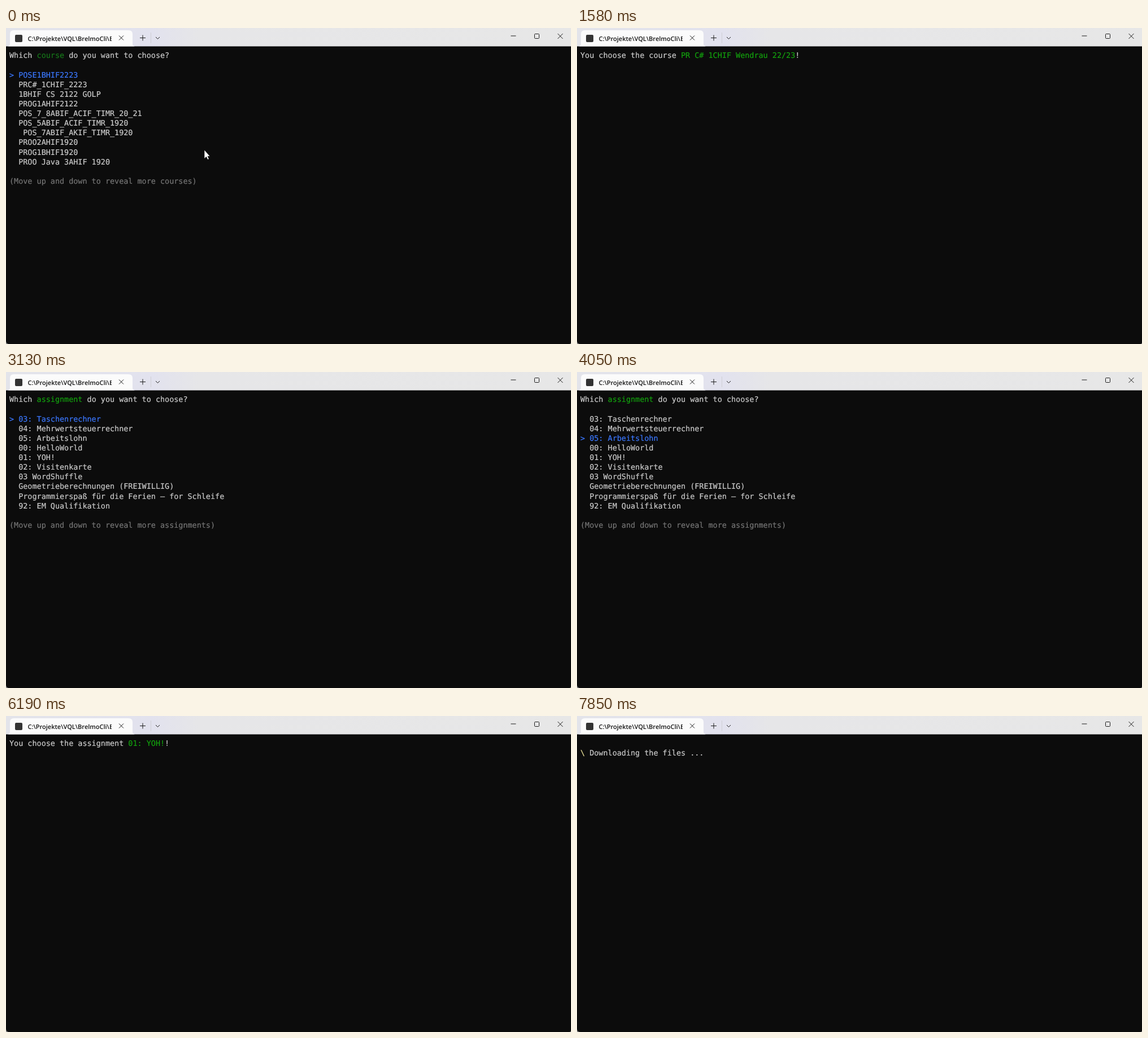
An HTML page for the animation above (7.99 s loop, 1000 by 560 pixels).

```html
<!DOCTYPE html>
<html lang="en">
<head>
<meta charset="utf-8">
<title>Terminal</title>
<style>
  html, body { margin: 0; width: 100%; height: 100%; overflow: hidden; background: #8c8c8c; }
  svg { display: block; width: 1000px; height: 560px; }
  text { white-space: pre; text-rendering: geometricPrecision; }
  #term { font: 13.454px "DejaVu Sans Mono", "Noto Sans Mono", monospace; font-variant-ligatures: none; }
  #term tspan { fill: var(--ink); stroke: var(--ink); stroke-width: .2px; }
  .title { font: 600 11px "Open Sans", "Noto Sans", sans-serif; fill: #111; }
  .line { fill: none; stroke: #1b1b1b; stroke-width: 1; }
  .plain { --ink: #ccc; }
  .green { --ink: #13a10e; }
  .dim { --ink: #17781a; }
  .blue { --ink: #3b78ff; }
  .gray { --ink: #767676; }
  .yellow { --ink: #f0e79c; }
</style>
</head>
<body>
<svg viewBox="0 0 1000 560">
  <defs>
    <linearGradient id="bar">
      <stop offset="0" stop-color="#e3e4ea"/>
      <stop offset=".26" stop-color="#e2e2ee"/>
      <stop offset=".34" stop-color="#e6e6e8"/>
      <stop offset="1" stop-color="#e7e7e7"/>
    </linearGradient>
    <clipPath id="titleClip"><rect x="36" y="8" width="151" height="20"/></clipPath>
  </defs>

  <path d="M0 30H1000V557Q1000 560 997 560H6Q0 560 0 554Z" fill="#0c0c0c"/>
  <rect width="1000" height="32.5" fill="url(#bar)"/>
  <path d="M3 32.500Q7 32 7 28V11Q7 4 14 4H217Q224 4 224 11V28Q224 32 228 32.500Z" fill="#fbfbfb"/>
  <rect x="16" y="12" width="13" height="13" rx="2" fill="#333"/>
  <g clip-path="url(#titleClip)"><text class="title" x="38.5" y="22.5" textLength="">C:\Projekte\VQL\BrelmoCli\B</text></g>
  <path class="line" d="M200 13.500l8 8m0-8l-8 8M237 17.500h10m-5-5v10M265 16l3.500 3.500 3.500-3.500"/>
  <path d="M256.500 8v19" stroke="#cfcfd6"/>
  <path class="line" d="M893.500 14h9M976.500 10l9 9m0-9l-9 9"/>
  <rect class="line" x="935.5" y="10.5" width="8" height="8" rx="1"/>

  <g id="term"></g>
  <path id="pointer" d="M351 216V231.500L354.500 228.200 357 233.300 359.300 232.200 357 227.300H361Z"
        fill="#fff" stroke="#000" stroke-width=".6"/>
</svg>

<script>
const LOOP = 7990;
const ROW = 17.12;
const SPIN = "-\\|/";
const term = document.getElementById("term");
const pointer = document.getElementById("pointer");

const courses = [
  "POSE1BHIF2223", "PRC#_1CHIF_2223", "1BHIF CS 2122 GOLP", "PROG1AHIF2122",
  "POS_7_8ABIF_ACIF_TIMR_20_21", "POS_5ABIF_ACIF_TIMR_1920", " POS_7ABIF_AKIF_TIMR_1920",
  "PROO2AHIF1920", "PROG1BHIF1920", "PROO Java 3AHIF 1920"
];
const tasks = [
  "03: Taschenrechner", "04: Mehrwertsteuerrechner", "05: Arbeitslohn", "00: HelloWorld",
  "01: YOH!", "02: Visitenkarte", "03 WordShuffle", "Geometrieberechnungen (FREIWILLIG)",
  "Programmierspaß für die Ferien – for Schleife", "92: EM Qualifikation"
];

function el(name, attrs, text = "") {
  const node = document.createElementNS("http://www.w3.org/2000/svg", name);
  for (const key in attrs) node.setAttribute(key, attrs[key]);
  node.textContent = text;
  return node;
}

// parts: class, text, class, text, ...
function print(row, ...parts) {
  const line = el("text", { x: 6, y: (53.3 + row * ROW).toFixed(2) });
  for (let i = 0; i < parts.length; i += 2) {
    line.append(el("tspan", { class: parts[i] }, parts[i + 1]));
  }
  term.append(line);
}

function menu(noun, tone, items, selected) {
  print(0, "plain", "Which ", tone, noun, "plain", " do you want to choose?");
  items.forEach((item, i) => {
    const on = i === selected;
    print(i + 2, on ? "blue" : "plain", (on ? "> " : "  ") + item);
  });
  print(13, "gray", `(Move up and down to reveal more ${noun}s)`);
}

const courseMenu = n => () => menu("course", "dim", courses, n);
const taskMenu = n => () => menu("assignment", "green", tasks, n);

const courseChosen = () =>
  print(0, "plain", "You choose the course ", "green", "PR C# 1CHIF Wendrau 22/23", "plain", "!");
const courseTail = () =>
  print(0, "green", " ".repeat(25) + "C# 1CHIF Wendrau 22/23", "plain", "!");
const taskChosen = () =>
  print(0, "plain", "You choose the assignment ", "green", "01: YOH!", "plain", "!");
const taskHead = () => print(0, "plain", "You choose the assign");
const blank = () => {};

const status = (label, header, phase) => () => {
  header();
  print(1, "yellow", SPIN[phase % 4], "plain", " " + label);
};

// One spinner step per time; the header above depends on the time.
function spin(label, times, phase, headerAt) {
  return times.map((t, i) => [t, status(label, headerAt(t), phase + i)]);
}

const scenes = [
  [0, courseMenu(0)],
  [720, courseMenu(1)],
  [1510, blank],
  [1580, courseChosen],
  ...spin("Loading assignments...",
    [1710, 1780, 1910, 1980, 2110, 2240, 2380, 2450, 2580, 2650, 2780], 0,
    t => t < 1980 ? courseChosen : courseTail),
  [2930, blank],
  [3130, taskMenu(0)],
  [3790, taskMenu(1)],
  [4050, taskMenu(2)],
  [4320, taskMenu(3)],
  [4980, taskMenu(4)],
  [6190, taskChosen],
  ...spin("Downloading the files ...",
    [6260, 6330, 6460, 6600, 6660, 6790, 6860, 6990, 7060, 7190, 7320, 7450, 7520, 7660, 7720, 7850], 2,
    t => t < 6460 ? taskChosen : t < 6990 ? taskHead : blank)
];

const start = performance.now();
let shown = -1;

function frame() {
  const t = (performance.now() - start) % LOOP;
  let i = scenes.length - 1;
  while (scenes[i][0] > t) i--;
  if (i !== shown) {
    shown = i;
    term.replaceChildren();
    scenes[i][1]();
    pointer.style.display = t < 1510 ? "" : "none";
  }
  requestAnimationFrame(frame);
}
frame();
</script>
</body>
</html>
```
